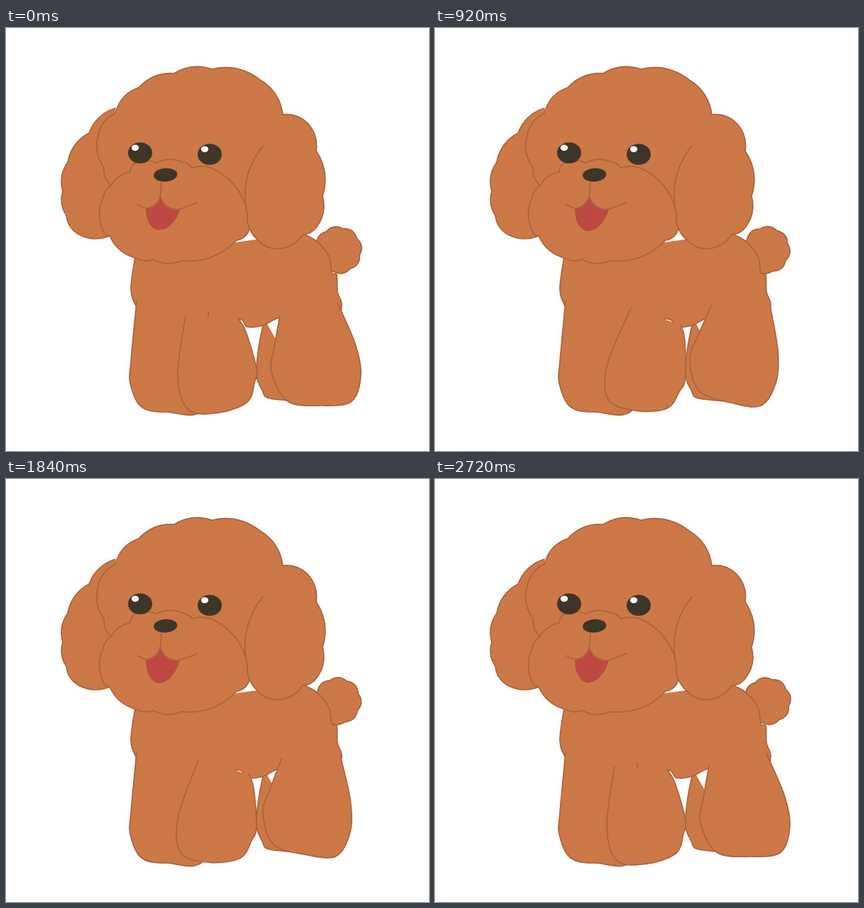
An HTML page that plays this animation: 596x596 px, repeating every 3.04 s.

```html
<!DOCTYPE html>
<html lang="en">
<head>
<meta charset="utf-8">
<title>Walking puppy</title>
<style>
  html, body { margin: 0; width: 100%; height: 100%; overflow: hidden; background: #fff; }
  svg { display: block; width: 100vw; height: 100vh; }
</style>
</head>
<body>
<svg id="stage" viewBox="0 0 596 596"></svg>
<script>
const NS = "http://www.w3.org/2000/svg";
const FUR = "#cd7847", LINE = "#aa643c", DARK = "#3d3527";
const stage = document.getElementById("stage");

function add(tag, attrs) {
  const el = document.createElementNS(NS, tag);
  for (const k in attrs) el.setAttribute(k, attrs[k]);
  return stage.appendChild(el);
}

const points = text => text.trim().split(/\s+/).map(s => s.split(",").map(Number));

// Smooth curve through the points
function curve(p) {
  let d = "M" + p[0];
  for (let i = 0; i < p.length - 1; i++) {
    const b = p[i], c = p[i + 1], a = p[i - 1] || b, e = p[i + 2] || c;
    const c1 = b.map((v, n) => v + (c[n] - a[n]) / 6);
    const c2 = c.map((v, n) => v - (e[n] - b[n]) / 6);
    d += `C${c1} ${c2} ${c}`;
  }
  return d;
}

// Fluffy edge: every step between notches, going clockwise, swells outwards
function puffs(p, swell = 0.12) {
  let d = "M" + p[0];
  for (let i = 1; i < p.length; i++) {
    const [x, y] = p[i - 1], [u, v] = p[i];
    d += `Q${(x + u) / 2 + (v - y) * 2 * swell},${(y + v) / 2 - (u - x) * 2 * swell} ${u},${v}`;
  }
  return d;
}

// Open outline; the fill closes it by itself
const part = (d, fill = FUR) => add("path", { d, fill, stroke: LINE, "stroke-width": 1.7,
  "stroke-linecap": "round", "stroke-linejoin": "round" });
const limb = text => part(curve(points(text)));
const fluff = text => part(puffs(points(text)));
const crease = text => part(curve(points(text)), "none");

// Tail: a ring of eight equal tufts
const ring = Array.from({ length: 9 }, (_, i) => {
  const a = (12.5 + 45 * i) * Math.PI / 180;
  return [468 + 31 * Math.cos(a), 313 + 31 * Math.sin(a)];
});
const tail = part(puffs(ring, 0.2));

const farBack = limb("364,410 356,450 353,489 361,510 372,522 430,527");
limb(`182,322 176,368 184,393 200,415 260,425 325,410 340,421 362,419 390,408 430,425 465,412 473,390
  467,372 466,348 459,345 455,322 437,300 416,289`);
const farFront = limb("184,385 176,470 175,500 190,533 225,541 282,532 285,400");
const nearBack = limb("386,405 378,450 374,485 397,526 445,532 487,526 500,488 492,445 467,387");
const nearFront = limb("253,405 242,490 257,538 300,542 340,527 350,500 353,480 338,428 327,409");

// Head
fluff("146,293 101,290 85,264 80,230 87,189 117,148 154,113");
fluff("300,300 148,222 138,197 130,150 154,120 156,114 187,84 237,64 290,58 358,73 390,122 345,270");
fluff(`148,222 137,238 138,288 146,293 185,325 207,326 247,328 325,299 341,288 341,267 300,203 262,197
  249,189 212,190 181,191 175,203 148,222`.split(/\s+/).reverse().join(" "));
fluff("389,122 425,134 437,173 446,237 438,280 418,291 385,311 354,298 340,262 362,166");

// Face
const tongue = add("path", { fill: "#be4943", stroke: "#ac463c" });
crease("219,217 217,238 210,249 198,254 185,249");
crease("217,238 225,250 239,256 254,252 269,246");
for (const [x, y] of [[189, 176], [287, 178]]) {
  add("ellipse", { cx: x, cy: y, rx: 17, ry: 14.8, fill: DARK });
  add("ellipse", { cx: x - 7, cy: y - 7.3, rx: 5.2, ry: 4.2, fill: "#fff" });
}
add("ellipse", { cx: 224.7, cy: 207, rx: 16.6, ry: 9.5, fill: DARK, transform: "rotate(-4 224.7 207)" });

const STEP = 40, LOOP = 3040, LAST = 68, STRIDE = 28;
const WAG = 17, PANT = STRIDE * 2 / 3;

// Half sine over len steps, once per stride
function swing(f, start, len) {
  const k = (f - start + STRIDE) % STRIDE;
  return k < len ? Math.sin(Math.PI * k / len) : 0;
}

const wave = (f, period) => (1 - Math.cos(2 * Math.PI * f / period)) / 2;

function turn(el, deg, x, y) {
  el.setAttribute("transform", `rotate(${deg.toFixed(3)} ${x} ${y})`);
}

function draw(ms) {
  const f = Math.min(LAST, Math.floor(ms % LOOP / STEP));
  const wake = Math.min(1, f / 4);
  const near = wake * swing(f, 14, 15);
  const far = wake * swing(f, 24, 16);

  turn(nearFront, 16.3 * near, 302, 485);
  turn(nearBack, 14.2 * near, 448, 412);
  turn(farFront, 11.5 * far, 230, 385);
  turn(farBack, 7 * far, 410, 420);
  turn(tail, 20 * wave(f, WAG), 468, 309);

  const b = 284 + 3 * wave(f, PANT);
  tongue.setAttribute("d", `M217,238C222,249 229,255 244,256C242,266 231,${b} 216,${b}` +
    `C204,${b} 197,270 198,254C208,253 215,246 217,238Z`);
}

const begin = performance.now();
function tick() {
  draw(performance.now() - begin);
  requestAnimationFrame(tick);
}
tick();
</script>
</body>
</html>
```
